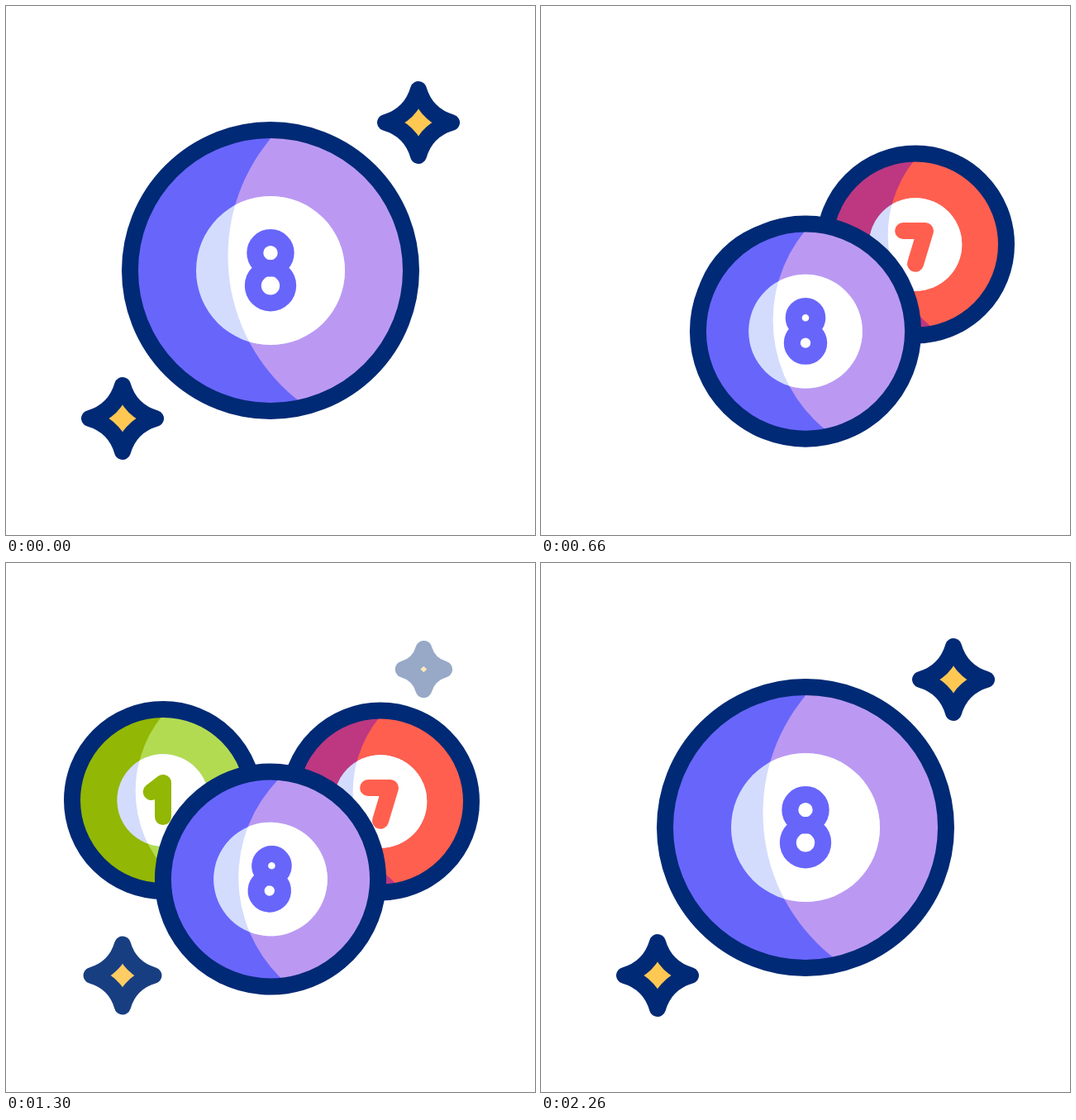
Animation of 640 by 640 pixels, one loop 2400 ms. Source, as an HTML page:

```html
<!DOCTYPE html>
<html lang="en">
<head>
<meta charset="utf-8">
<title>Pool balls</title>
<style>
  html, body { margin: 0; width: 100%; height: 100%; overflow: hidden; background: #fff; }
  svg { display: block; width: 100%; height: 100%; }
  .rim, .digit, .star {
    vector-effect: non-scaling-stroke;
    stroke-width: 20; stroke-linecap: round; stroke-linejoin: round;
  }
  .rim { fill: none; stroke: #002a75; }
  .digit { fill: none; stroke: var(--ink); }
  .dark { fill: var(--dark); }
  .light { fill: var(--light); }
  .shade { fill: #d3dcfd; }
  .spot { fill: #fff; }
  .star { fill: #ffc853; stroke: #002a75; }
  #one { --dark: #92b704; --light: #b2db52; --ink: #92b704; }
  #seven { --dark: #bd3880; --light: #ff5f4f; --ink: #ff5f4f; }
  #eight { --dark: #6865fb; --light: #bb99f2; --ink: #6865fb; }
</style>
</head>
<body>
<svg viewBox="0 0 640 640">
  <path class="star" id="starTop"/>
  <path class="star" id="starLow"/>
  <g id="one"></g>
  <g id="seven"></g>
  <g id="eight"></g>
</svg>
<script>
const LOOP = 2400;
const SMALL = 110 / 170;
const TWINKLE = 200;
const $ = id => document.getElementById(id);

const ring = (y, r) =>
  `M0 ${y - r}a${r} ${r} 0 1 1 0 ${2 * r}a${r} ${r} 0 1 1 0 ${-2 * r}z`;

function buildBall(id, spot, digit) {
  const glow = 'cx="170.5" cy="-17.5" r="222"';
  $(id).innerHTML = `
    <clipPath id="${id}Ball"><circle r="170"/></clipPath>
    <clipPath id="${id}Spot"><circle r="${spot}"/></clipPath>
    <circle class="dark" r="170"/>
    <g clip-path="url(#${id}Ball)"><circle class="light" ${glow}/></g>
    <circle class="shade" r="${spot}"/>
    <g clip-path="url(#${id}Spot)"><circle class="spot" ${glow}/></g>
    <path class="digit" d="${digit}"/>
    <circle class="rim" r="170"/>`;
}

buildBall('one', 86, 'M-22-15.5 0-32.5V31');
buildBall('seven', 87, 'M-23-25.5H18.5L0 36');
buildBall('eight', 90, ring(-21.3, 18.7) + ring(18.3, 21.2));

for (const star of document.querySelectorAll('.star'))
  star.setAttribute('d', 'M0-40Q9-9 40 0Q9 9 0 40Q-9 9-40 0Q-9-9 0-40z');

const clamp = v => Math.min(1, Math.max(0, v));
const mix = (a, b, p) => a + (b - a) * p;
const mixPoint = (a, b, p) => [mix(a[0], b[0], p), mix(a[1], b[1], p)];

// Eased progress from 0 to 1 between two times.
function ramp(t, from, to) {
  const p = clamp((t - from) / (to - from));
  return p * p * (3 - 2 * p);
}

// Rises and falls evenly around its peak time.
const twinkle = (t, peak) => clamp(1 - Math.abs(t - peak) / TWINKLE);

// Full strength while the loop rests, fading on either side.
const rest = t => clamp((420 - t) / TWINKLE) + clamp((t - 2060) / TWINKLE);

// One full rocking turn of the front ball.
const rock = t => -5 * Math.sin(2 * Math.PI * clamp((t - 880) / 560));

function place(id, [x, y], scale, turn = 0) {
  $(id).setAttribute('transform', `translate(${x} ${y}) rotate(${turn}) scale(${scale})`);
}

function placeStar(id, point, strength) {
  place(id, point, mix(.36, 1, strength));
  $(id).setAttribute('opacity', strength);
}

// A side ball slides out from behind the front ball and returns.
function placeSide(id, hidden, shown, home, out, back) {
  place(id, mixPoint(mixPoint(hidden, shown, out), home, back), SMALL);
}

function draw(t) {
  const back = ramp(t, 1760, 2260);
  const out = ramp(t, 220, 590);
  const shrink = out - back;
  const lift = 11.5 * (ramp(t, 640, 820) - ramp(t, 1300, 1500));

  place('eight', [320, mix(320, 394, shrink) - lift], mix(1, .765, shrink), rock(t));
  placeSide('seven', [306, 306], [453, 288.5], [324, 304], out, back);
  placeSide('one', [306, 380], [190, 287], [294, 290], ramp(t, 635, 990), back);
  $('one').setAttribute('visibility', t < 635 ? 'hidden' : 'visible');

  const drift = clamp((t - 1220) / TWINKLE) * (t < 1800);
  placeStar('starTop', mixPoint([499, 141], [515, 110], drift), rest(t) + twinkle(t, 1420));
  placeStar('starLow', [141, 499], rest(t) + twinkle(t, 1280) + twinkle(t, 1740));
}

let start;
function tick(now) {
  start ??= now;
  draw((now - start) % LOOP);
  requestAnimationFrame(tick);
}
draw(0);
requestAnimationFrame(tick);
</script>
</body>
</html>
```
